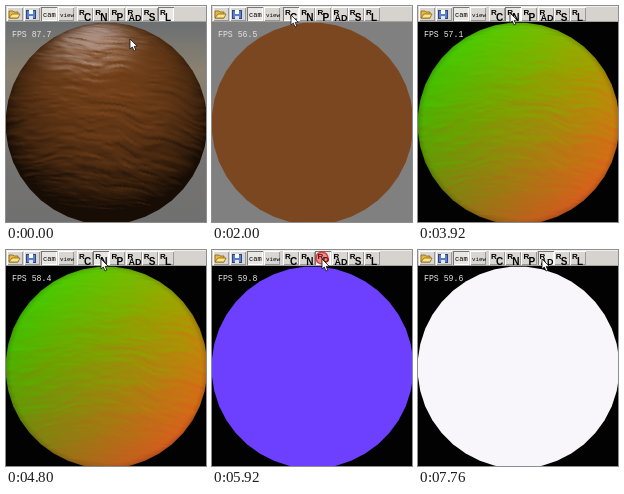
Recreate the animation shown at these times as an HTML page with a canvas. Size 200x216 px, loop 8 s.

```html
<!DOCTYPE html>
<html>
<head>
<meta charset="utf-8">
<style>
html, body { margin: 0; width: 100%; height: 100%; overflow: hidden; background: #000; }
canvas { display: block; }
</style>
</head>
<body>
<canvas id="stage" width="200" height="216"></canvas>
<script>
const LOOP = 8000, STEP = 80, R = 101, CX = 100.5, CY = 117.5, BAR = 16;
const ctx = document.getElementById('stage').getContext('2d');
const layer = document.createElement('canvas');
layer.width = 200;
layer.height = 216;
const layerCtx = layer.getContext('2d');

const buttons = ['C', 'N', 'P', 'AD', 'S', 'L'];
const flat = { C: '#7b4720', P: '#6d40ff', AD: '#f9f6fb' };
const modes = [[0, 'L'], [1360, 'C'], [3600, 'N'], [5920, 'P'], [7200, 'AD']];
const clicks = [[1200, 79, 9], [3440, 93, 8], [5760, 110, 8], [7040, 126, 8]];
const rates = [[0, '87.7'], [400, '71.2'], [800, '55.9'], [1360, '57.8'], [1840, '56.5'],
  [2320, '58.9'], [2960, '59.7'], [3760, '57.1'], [4560, '58.4'], [5040, '59.2'],
  [5600, '59.8'], [6320, '59.5'], [6960, '58.8'], [7520, '59.6']];
const path = [[0, 124, 33], [80, 124, 33], [800, 79, 9], [2720, 79, 9], [3280, 92, 7],
  [4560, 92, 7], [4800, 95, 9], [5360, 110, 9], [6560, 110, 9], [6960, 124, 9]];

const latest = (list, t) => list.filter(item => item[0] <= t).pop()[1];
const smooth = p => p * p * (3 - 2 * p);
const clamp = p => Math.max(0, Math.min(1, p));
const mix = (a, b, p) => a + (b - a) * p;

function hash(x, y) {
  const s = Math.sin(x * 127.1 + y * 311.7) * 43758.5453;
  return s - Math.floor(s);
}

function noise(x, y) {
  const i = Math.floor(x), j = Math.floor(y), u = smooth(x - i), v = smooth(y - j);
  return mix(mix(hash(i, j), hash(i + 1, j), u), mix(hash(i, j + 1), hash(i + 1, j + 1), u), v);
}

function bark(u, v) {
  const y = v + 0.1 * noise(u * 3 + 9, v * 3);
  return noise(u * 2.2, y * 10) * 0.42 + noise(u * 4 + 4, y * 21) * 0.36 + noise(u * 8, y * 36) * 0.2;
}

// Height map over the visible surface, 100 cells per unit
const MW = 400, MH = 320;
const heights = new Float32Array(MW * MH);
for (let i = 0; i < heights.length; i++) {
  heights[i] = bark((i % MW - MW / 2) / 100, (Math.floor(i / MW) - MH / 2) / 100);
}

function woodColor(x, y, z, turn) {
  const hx = mix(-0.15, -0.02, turn), hy = mix(0.87, 0.82, turn);
  const hz = Math.sqrt(1 - hx * hx - hy * hy);
  const light = 0.2 + 0.8 * clamp(y * 0.5 + z * 0.8);
  const shine = Math.pow(clamp(x * hx + y * hy + z * hz), 14);
  return [120 * light + 70 * shine, 67 * light + 88 * shine, 26 * light + 110 * shine];
}

function normalColor(x, y, z) {
  const rim = 0.75 + 0.25 * clamp(z * 3);
  return [(142 + 62 * x - 42 * y) * rim, (148 + 50 * y - 26 * x) * rim, (6 + 10 * x - 22 * y) * rim];
}

function renderRelief(mode, turn) {
  const image = layerCtx.createImageData(200, 216);
  const shade = mode === 'L' ? woodColor : normalColor;
  const depth = mode === 'L' ? 1.7 : 1.2;
  const roll = mix(0.1, 0, turn), c = Math.cos(roll), s = Math.sin(roll);
  const shift = mix(0.2, 0, turn);
  for (let py = BAR; py < 216; py++) {
    for (let px = 0; px < 200; px++) {
      let x = (px + 0.5 - CX) / R, y = (CY - py - 0.5) / R;
      const d = Math.hypot(x, y);
      if (d > 0.995) { x *= 0.995 / d; y *= 0.995 / d; }
      const z = Math.sqrt(1 - x * x - y * y);
      const u = (x * c - y * s) * 1.3 + shift;
      const v = Math.asin(x * s + y * c) + 0.14 * x * x + 0.06 * x;
      const row = Math.max(1, Math.min(MH - 2, Math.round(v * 100 + MH / 2)));
      const i = row * MW + Math.round(u * 100 + MW / 2);
      const bx = (heights[i + 1] - heights[i - 1]) * depth;
      const by = (heights[i + MW] - heights[i - MW]) * depth;
      const nx = x - bx, ny = y - by, len = Math.hypot(nx, ny, z);
      image.data.set([...shade(nx / len, ny / len, z / len, turn), 255], (py * 200 + px) * 4);
    }
  }
  layerCtx.putImageData(image, 0, 0);
}

function backdrop(mode) {
  if (mode === 'C') return '#808080';
  if (mode !== 'L') return '#020203';
  const sky = ctx.createLinearGradient(0, BAR, 0, 216);
  ['#6b7072', '#8b8271', '#7c7a73', '#747371', '#707070'].forEach((color, i) => sky.addColorStop(i / 4, color));
  return sky;
}

let drawn = '';
function drawScene(mode, t) {
  ctx.fillStyle = backdrop(mode);
  ctx.fillRect(0, 0, 200, 216);
  ctx.save();
  ctx.beginPath();
  for (let i = 0; i < 40; i++) {
    const a = (i + 0.5) * Math.PI / 20;
    ctx.lineTo(CX + R * Math.cos(a), CY + R * Math.sin(a));
  }
  ctx.closePath();
  if (flat[mode]) {
    ctx.fillStyle = flat[mode];
    ctx.fill();
  } else {
    const turn = mode === 'L' ? smooth(clamp(t / 880)) : 1, key = mode + turn;
    if (key !== drawn) renderRelief(mode, turn);
    drawn = key;
    ctx.clip();
    ctx.drawImage(layer, 0, 0);
  }
  ctx.restore();
}

function rect(color, x, y, w, h) {
  ctx.fillStyle = color;
  ctx.fillRect(x, y, w, h);
}

function label(text, x, y, font, color = '#000') {
  ctx.font = font;
  ctx.fillStyle = color;
  ctx.fillText(text, x, y);
}

function box(x, w, pressed) {
  rect(pressed ? '#777' : '#fff', x, 1, w, 14);
  rect(pressed ? '#fff' : '#999', x + 1, 2, w - 1, 13);
  rect(pressed ? '#e9e7e3' : '#dad7d2', x + 1, 2, w - 2, 12);
}

function polygon(points, fill, stroke) {
  ctx.beginPath();
  points.forEach(([x, y]) => ctx.lineTo(x, y));
  ctx.closePath();
  ctx.fillStyle = fill;
  ctx.fill();
  ctx.strokeStyle = stroke;
  ctx.lineWidth = 0.8;
  ctx.stroke();
}

function drawToolbar(mode) {
  rect('#d6d3ce', 0, 0, 200, BAR);
  rect('#f0eeea', 0, 0, 200, 1);
  rect('#a5a29c', 0, 15, 200, 1);
  box(1, 16, false);
  box(18, 16, false);
  polygon([[3, 12], [3, 5], [7, 5], [8, 6], [12, 6], [12, 12]], '#e8b840', '#8a6414');
  polygon([[3, 12], [6, 8], [14, 8], [12, 12]], '#ffe58a', '#8a6414');
  rect('#2d4583', 20, 4, 10, 9);
  rect('#5b7fc8', 21, 5, 8, 7);
  rect('#fff', 23, 4, 4, 4);
  rect('#dfe5f0', 23, 10, 4, 3);
  box(35, 16, true);
  box(52, 16, false);
  label('cam', 37, 11, '7px "Liberation Mono", monospace');
  label('view', 54, 11, '5.8px "Liberation Mono", monospace');
  buttons.forEach((name, i) => {
    const x = 71 + i * 16.2;
    box(Math.round(x), 16, name === mode);
    label('R', x + 2, 9, 'bold 8px "Liberation Sans", sans-serif');
    label(name, x + (name === 'AD' ? 3 : 7), 15, `bold ${name === 'AD' ? 9 : 10}px "Liberation Sans", sans-serif`);
  });
}

function drawClick(t) {
  for (const [start, x, y] of clicks) {
    const age = (t - start) / 400;
    if (age < 0 || age >= 1) continue;
    ctx.beginPath();
    ctx.arc(x, y, 6, 0, 7);
    ctx.fillStyle = `rgba(222,40,40,${0.75 * (1 - age)})`;
    ctx.fill();
    ctx.strokeStyle = `rgba(215,25,30,${0.95 - age * 0.5})`;
    ctx.lineWidth = 1.6;
    ctx.stroke();
  }
}

function drawCursor(t) {
  const k = path.findLastIndex(point => point[0] <= t);
  const a = path[k], b = path[k + 1] || a;
  const p = a === b ? 0 : smooth((t - a[0]) / (b[0] - a[0]));
  ctx.save();
  ctx.translate(mix(a[1], b[1], p), mix(a[2], b[2], p));
  polygon([[0, 0], [0, 10], [2.3, 8], [4, 12], [5.8, 11.2], [4.2, 7.4], [7.2, 7.2]], '#fff', '#111');
  ctx.restore();
}

function frame() {
  const t = Math.floor(performance.now() % LOOP / STEP) * STEP;
  const mode = latest(modes, t);
  drawScene(mode, t);
  label('FPS ' + latest(rates, t), 6, 31, '8.2px "Liberation Mono", monospace', '#e4e4e4');
  drawToolbar(mode);
  drawClick(t);
  drawCursor(t);
  requestAnimationFrame(frame);
}
frame();
</script>
</body>
</html>
```
